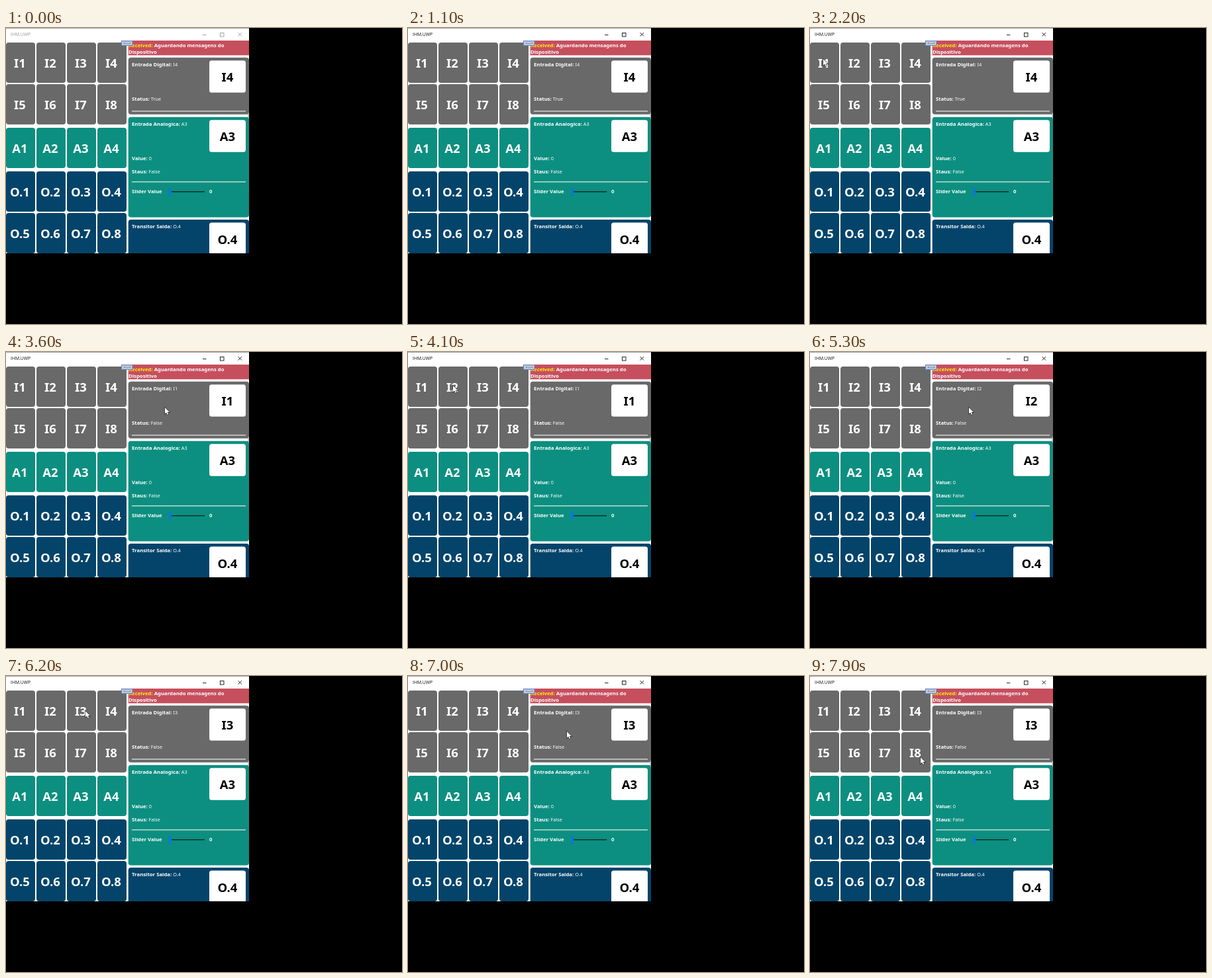
These frames come from a looping animation (598x448 px, 8 s). An HTML page with a canvas:

```html
<!DOCTYPE html>
<html lang="pt">
<head>
<meta charset="utf-8">
<title>IHM</title>
<style>
  html, body { margin: 0; width: 100%; height: 100%; overflow: hidden; background: #000; }
  canvas { display: block; }
</style>
</head>
<body>
<canvas id="stage" width="598" height="448"></canvas>
<script>
const ctx = document.getElementById('stage').getContext('2d');
const LOOP = 8000, STEP = 100;
const GRAY = '#696969', TEAL = '#0c8f80', BLUE = '#04446a', RED = '#c64f5d';
const FAMILY = 'px "Noto Sans", "Open Sans", sans-serif';
const BOLD = '700 7.75' + FAMILY, PLAIN = '500 7.3' + FAMILY, LABEL = '700 18.5' + FAMILY;
const LEFT = 190, PANEL = 184.7, WIDTH = 367, HEIGHT = 341;

const groups = [
  { prefix: 'I', count: 8, color: GRAY },
  { prefix: 'A', count: 4, color: TEAL },
  { prefix: 'O.', count: 8, color: BLUE }
];

// The pointer visits one key per cycle and rests over the card in between
const FIRST = 2200, CYCLE = 1850, MOVE = 400, REST = 600;
const ENTRY = { x: 150, y: 300 }, CARD = { x: 240, y: 84 };
const keys = [{ x: 20, y: 47 }, { x: 68, y: 51 }, { x: 120, y: 53 }, { x: 167, y: 123 }];

function rect(x, y, w, h, color) {
  ctx.fillStyle = color;
  ctx.fillRect(x, y, w, h);
}

function box(x, y, w, h, r, color) {
  ctx.fillStyle = color;
  ctx.beginPath();
  ctx.roundRect(x, y, w, h, r);
  ctx.fill();
}

function text(str, x, y, font, color = '#fff', align = 'left') {
  ctx.font = font;
  ctx.fillStyle = color;
  ctx.textAlign = align;
  ctx.fillText(str, x, y);
  return x + ctx.measureText(str).width;
}

function line(x0, y0, x1, y1) {
  ctx.beginPath();
  ctx.moveTo(x0, y0);
  ctx.lineTo(x1, y1);
  ctx.stroke();
}

function titleBar(active) {
  const ink = active ? '#111' : '#999';
  text('IHM.UWP', 7, 12.3, '400 6.8px "Open Sans", sans-serif', ink);
  ctx.strokeStyle = ink;
  ctx.lineWidth = 0.9;
  line(297, 10.5, 302.5, 10.5);
  ctx.strokeRect(323.5, 7.5, 5.5, 5.5);
  line(350.5, 7, 356, 12.5);
  line(356, 7, 350.5, 12.5);
}

function keypad() {
  let top = 22;
  for (const { prefix, count, color } of groups) {
    for (let i = 0; i < count; i++) {
      const x = i % 4 * 46, y = top + Math.floor(i / 4) * 63;
      box(x, y, 44, 61, 4, color);
      text(prefix + (i + 1), x + 21, y + 38, LABEL, '#fff', 'center');
    }
    top += count / 4 * 63 + 3;
  }
}

function header() {
  rect(PANEL, 19, WIDTH, 22.3, RED);
  const end = text('Received:', 185, 28.5, BOLD, '#ffee10');
  text('Aguardando mensagens do', end + 2, 28.5, BOLD);
  text('Dispositivo', 185, 38.7, BOLD);
  rect(174, 19, 17.5, 8, '#6883b5');
  rect(175, 20, 15.5, 6, '#bccbe7');
  rect(178, 21.5, 10, 2.5, '#7e8796');
  rect(179, 22, 8, 1, '#e8ecf4');
}

function field(name, value, y) {
  const end = text(name, LEFT, y, BOLD);
  text(value, end + 2, y, PLAIN);
}

function divider(y) {
  rect(LEFT, y, 172, 1.2, '#eee');
}

function card(y, h, color, title, name) {
  box(PANEL, y, WIDTH - PANEL, h, 4, color);
  field(title, name, y + 13.2);
  box(307, y + 4.5, 55, 48.5, 3.5, '#fff');
  text(name, 334.5, y + 36.6, LABEL, '#000', 'center');
}

function cards(count) {
  card(44.7, 86, GRAY, 'Entrada Digital:', 'I' + (count || 4));
  field('Status:', count ? 'False' : 'True', 110);
  divider(125.3);

  card(134.7, 151.8, TEAL, 'Entrada Analogica:', 'A3');
  field('Value:', '0', 200);
  field('Staus:', 'False', 220.3);
  divider(232.3);
  text('Slider Value', LEFT, 250.3, BOLD);
  rect(250, 247.2, 50, 1.2, '#0a1a18');
  box(246, 241, 4, 14, 2, '#0f78d4');
  text('0', 307, 250.3, BOLD);

  card(290, 60, BLUE, 'Transitor Saida:', 'O.4');
  rect(365.5, 129, 0.8, 114, '#4a7d78');
}

function glide(from, to, u) {
  const c = Math.min(1, Math.max(0, u)), k = c * c * (3 - 2 * c);
  return { x: from.x + (to.x - from.x) * k, y: from.y + (to.y - from.y) * k };
}

function pointerAt(t) {
  const since = t - FIRST;
  if (since < 0) return glide(ENTRY, keys[0], since / MOVE + 1);
  const visit = Math.floor(since / CYCLE), phase = since % CYCLE;
  if (phase < REST + MOVE) return glide(keys[visit], CARD, (phase - REST) / MOVE);
  return glide(CARD, keys[visit + 1], (phase - CYCLE) / MOVE + 1);
}

function pointer({ x, y }) {
  const arrow = new Path2D('M0 0V9.6L2.2 7.6L3.7 11L5.2 10.3L3.8 7.1H6.9Z');
  ctx.save();
  ctx.translate(x, y);
  ctx.lineWidth = 1.2;
  ctx.strokeStyle = '#222';
  ctx.stroke(arrow);
  ctx.fillStyle = '#fff';
  ctx.fill(arrow);
  ctx.restore();
}

function draw(t) {
  const picked = Math.min(3, Math.max(0, Math.floor((t - 2800) / 1700) + 1));
  rect(0, 0, 598, 448, '#000');
  ctx.save();
  ctx.beginPath();
  ctx.rect(0, 0, WIDTH, HEIGHT);
  ctx.clip();
  rect(0, 0, WIDTH, HEIGHT, '#fff');
  rect(0, 0, WIDTH, 0.6, '#666');
  titleBar(t >= 900);
  keypad();
  header();
  cards(picked);
  if (t >= FIRST - MOVE) pointer(pointerAt(t));
  ctx.restore();
}

const start = performance.now();
function tick() {
  const t = Math.max(0, performance.now() - start) % LOOP;
  draw(Math.floor(t / STEP) * STEP);
  requestAnimationFrame(tick);
}
tick();
</script>
</body>
</html>
```
